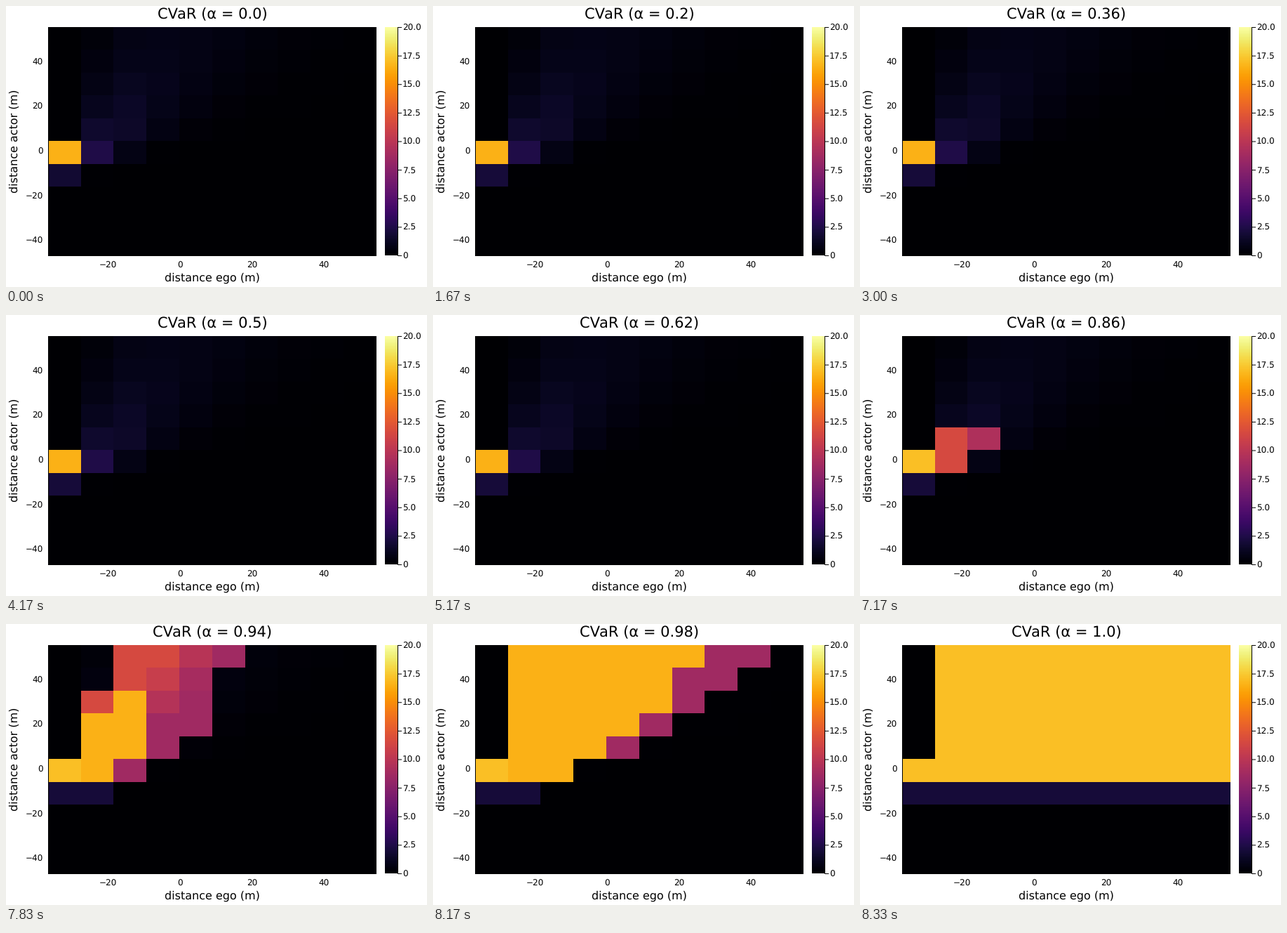
A matplotlib script that plays this animation: 600 px wide and 400 px high, repeating every 8490 ms.

```python
import numpy as np
import matplotlib.pyplot as plt
from matplotlib.animation import FuncAnimation

WIDTH, HEIGHT, DPI = 600, 400, 100
FRAMES, LOOP_MS = 51, 8490
LEFT, RIGHT, TOP, BOTTOM = 60, 528, 30, 355
BAR_LEFT, BAR_RIGHT = 540, 558
VMAX = 20.0
LOW, HIT, WORST = 2.0, 16.5, 17.1  # cost levels

plt.rcParams.update({
    "font.family": "DejaVu Sans",
    "text.hinting": "none",
    "text.hinting_factor": 1,
})

# The risk follows a ridge: the farther the actor, the farther and flatter its peak.
actor = np.arange(5, -1, -1)[:, None]
ego = np.arange(1, 10)[None, :]
peak = 1 + 0.4 * actor
offset = np.log(ego / peak)
spread = np.where(offset < 0, 1.5, 0.7 - 0.3 / (1 + actor) ** 2)
MEAN = 2.45 / peak * np.exp(-offset ** 2 / spread)
TAIL = np.maximum(11.5 - 6 * np.maximum(offset, 0), 8.6)  # mean of nonzero costs
P_COST = MEAN / TAIL
P_HIT = (MEAN - LOW * P_COST) / (HIT - LOW)
LOW_MEAN = 1.72 * 0.09 ** np.arange(10)


def cvar(alpha):
    """Mean cost of the outcomes at or beyond the alpha quantile."""
    grid = np.zeros((10, 10))
    risk = np.where(alpha >= 1 - P_COST, TAIL, MEAN)
    risk = np.where(alpha >= 1 - P_HIT, HIT, risk)
    grid[:6, 1:] = WORST if alpha >= 1 else risk
    grid[5, 0] = WORST if alpha >= 0.78 else HIT
    grid[6] = np.where(alpha >= 1 - LOW_MEAN / LOW, LOW, LOW_MEAN)
    return grid


fig = plt.figure(figsize=(WIDTH / DPI, HEIGHT / DPI), dpi=DPI, facecolor="white")
ax = fig.add_axes([0, 0, 1, 1])


def label(x, y, text, px, ha="center", rotation=0):
    return ax.text(x, y, text, fontsize=px * 72 / DPI, ha=ha, va="baseline",
                   rotation=rotation, rotation_mode="anchor", color="black")


def line(xs, ys):
    ax.plot(xs, ys, color="black", lw=0.72, solid_capstyle="butt", snap=False)


def image(data, extent):
    return ax.imshow(data, extent=extent, cmap="inferno", vmin=0, vmax=VMAX,
                     interpolation="nearest", aspect="auto")


def signed(value):
    return str(value).replace("-", "\u2212")


heat = image(cvar(0), (LEFT, RIGHT, BOTTOM, TOP))
image(np.linspace(VMAX, 0, 256)[:, None], (BAR_LEFT, BAR_RIGHT, BOTTOM, TOP))

line([LEFT + 0.5] * 2, [TOP, BOTTOM + 1])
line([LEFT, RIGHT], [BOTTOM + 0.5] * 2)
line([BAR_RIGHT + 0.5] * 2, [TOP, BOTTOM + 1])

TICK_PX, GUIDE_PX, TITLE_PX = 11.83, 16.26, 20.55
for v in range(-40, 41, 20):
    if v > -40:
        label(247.8 + 5.135 * v, 372.5, signed(v), TICK_PX)
    label(52.7, 210.7 - 3.182 * v, signed(v), TICK_PX, ha="right")
for v in np.arange(0, VMAX + 1, 2.5):
    y = BOTTOM + 0.5 - (BOTTOM - TOP) * v / VMAX
    line([BAR_RIGHT, BAR_RIGHT + 6], [y, y])
    label(565, y + 4.2, f"{v:.1f}" if v else "0", TICK_PX, ha="left")

middle = 294.4
label(middle, 392, "distance ego (m)", GUIDE_PX)
label(16.4, (TOP + BOTTOM) / 2, "distance actor (m)", GUIDE_PX, rotation=90)
title = label(middle, 18, "", TITLE_PX)

ax.set(xlim=(0, WIDTH), ylim=(HEIGHT, 0))
ax.axis("off")


def update(i):
    alpha = round(0.02 * i, 2)
    heat.set_data(cvar(alpha))
    title.set_text(f"CVaR (α = {alpha})")
    return heat, title


anim = FuncAnimation(fig, update, frames=FRAMES, interval=LOOP_MS / FRAMES,
                     repeat=True, repeat_delay=0)
plt.show()
```
